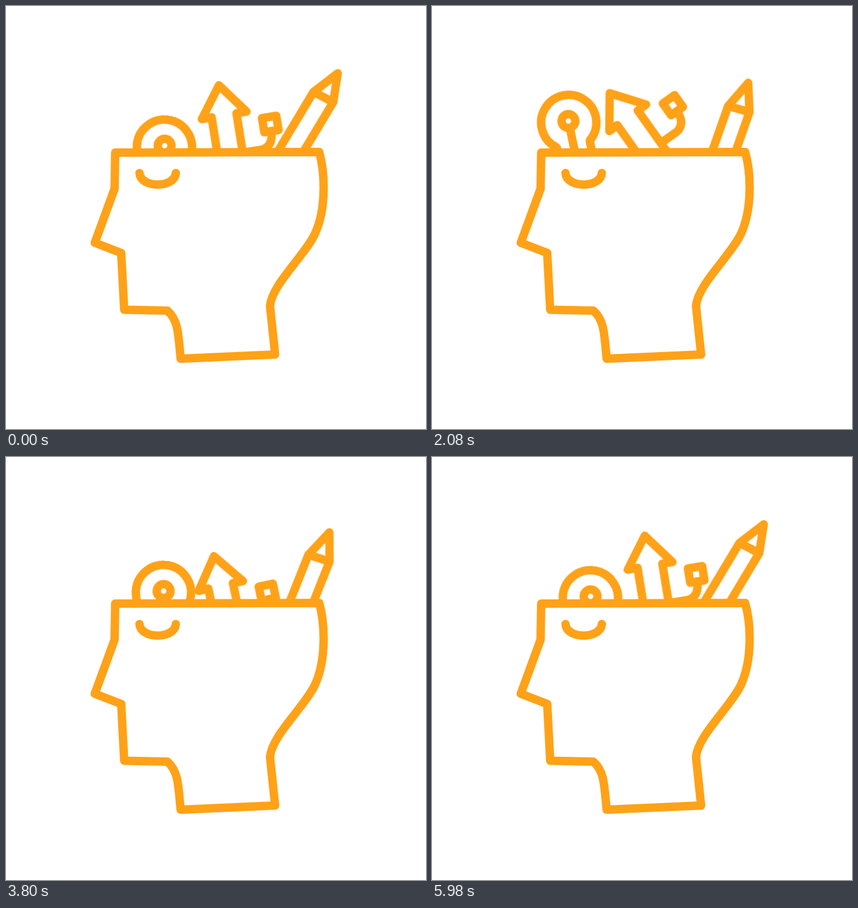
An HTML page that plays this animation: 700 px wide and 704 px high, repeating every 6 s.

```html
<!DOCTYPE html>
<html lang="en">
<head>
<meta charset="utf-8">
<title>Open mind</title>
<style>
  html, body { margin: 0; width: 100%; height: 100%; overflow: hidden; background: #fff; }
  svg { display: block; width: 700px; height: 704px; }
  .lines { fill: none; stroke: #ffa218; stroke-width: 14; stroke-linecap: round; stroke-linejoin: round; }

  /* Every pose is 1.5 s apart; this curve is a plain smoothstep. */
  .item { animation: 6s cubic-bezier(.3333, 0, .6667, 1) infinite; transform-origin: 0 0; }
  .bulb { animation-name: bulb; animation-delay: -5730ms; }
  .arrow { animation-name: arrow; animation-delay: -5100ms; }
  .pencil { animation-name: pencil; }

  @keyframes bulb {
    0%, 100% { transform: translate(264.4px, 239px) rotate(8deg); }
    25% { transform: translate(223.5px, 188.3px) rotate(-14deg); }
    50% { transform: translate(263.3px, 239px) rotate(6deg); }
    75% { transform: translate(260.3px, 192.3px) rotate(5deg); }
  }
  @keyframes arrow {
    0%, 100% { transform: translate(366px, 159.5px) rotate(-3.5deg); }
    25% { transform: translate(287px, 143.3px) rotate(-39.6deg); }
    50% { transform: translate(347.3px, 165.5px) rotate(-11.8deg); }
    75% { transform: translate(348.8px, 117px) rotate(-12.2deg); }
  }
  @keyframes pencil {
    0%, 100% { transform: translate(553px, 112px) rotate(31deg); }
    25% { transform: translate(521px, 145.5px) rotate(20.3deg); }
    50% { transform: translate(539px, 93px) rotate(17.7deg); }
    75% { transform: translate(539px, 152px) rotate(25deg); }
  }
</style>
</head>
<body>
<svg viewBox="0 0 700 704">
  <clipPath id="above"><path d="M0 0H700V240H0Z"/></clipPath>
  <g class="lines">
    <g clip-path="url(#above)">
      <g class="item bulb">
        <path d="M-28 90V36.5A46 46 0 1 1 28 36.5V90"/>
        <circle cy="-2.5" r="11.5"/>
        <path d="M0 9V90"/>
      </g>
      <g class="item arrow">
        <path d="M-20.5 250V50.5L-37 51L0 0L38.5 50.5H21.5V250"/>
        <path d="M62.3 65.3h24v24h-24z"/>
        <path d="M74 89C74 107 66 116 53 117H22"/>
      </g>
      <g class="item pencil">
        <path d="M-18.7 250V47.5L0 0L18.2 45V250M-18.7 47.5L18.2 45"/>
      </g>
    </g>
    <path d="M182 244L522 243C531 275 535 335 515 379C497 417 444 462 440 499L448.500 580L291 587C287 540 286 522 269 507L197 505.500L192 411L148 394L181 304Z"/>
    <path d="M222.500 278C224 303.500 281.500 303.500 283 278"/>
  </g>
</svg>
</body>
</html>
```
